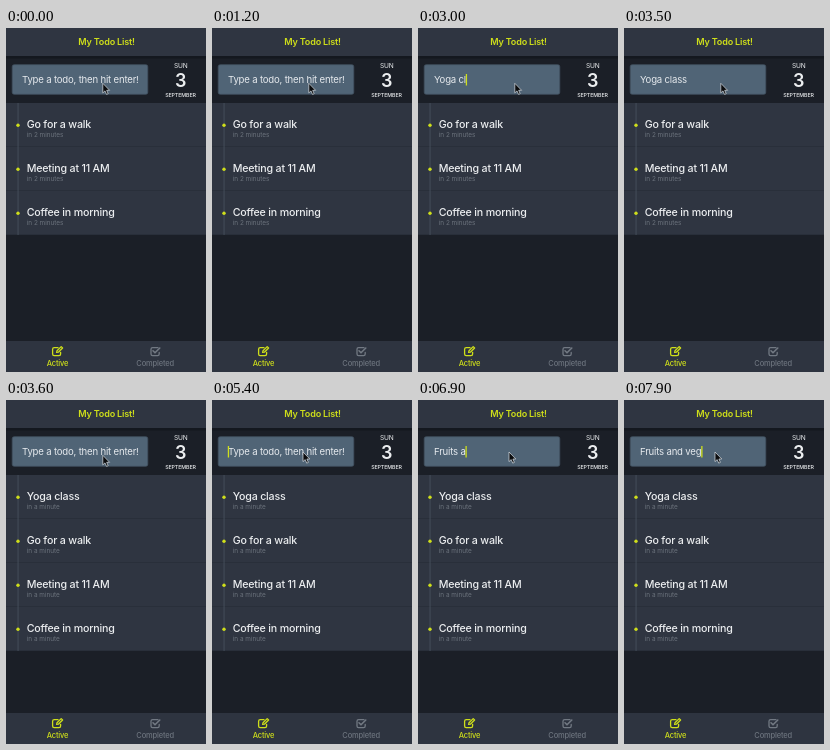
Recreate the animation shown at these times as an HTML page. Size 200x344 px, loop 8000 ms.

```html
<!DOCTYPE html>
<html lang="en">
<head>
<meta charset="utf-8">
<title>My Todo List</title>
<style>
  html, body { margin: 0; width: 100%; height: 100%; overflow: hidden; background: #1b1f27; }
  svg { display: block; width: 100%; height: 100%; }
  text { font-family: Inter, Roboto, sans-serif; letter-spacing: -.02em; white-space: pre; }
  .mid { text-anchor: middle; }
  .accent { fill: #cfdf1a; }
  .white { fill: #eceef0; }
  .muted { fill: #6c737d; }
  .field { font-size: 9.6px; fill: #e6eaee; }
  .todo { font-size: 10.67px; font-weight: 500; letter-spacing: -.018em; }
  .age { font-size: 6.4px; letter-spacing: 0; }
  .tab { font-size: 7.5px; font-weight: 500; }
  .icon { fill: none; stroke-width: 1.3; stroke-linejoin: round; stroke-linecap: round; }
</style>
</head>
<body>
<svg viewBox="0 0 200 344" preserveAspectRatio="none">
  <rect width="200" height="344" fill="#1b1f27"/>
  <rect width="200" height="28" fill="#2f3541"/>
  <rect y="28" width="200" height="2.5" fill="#14181f"/>
  <text class="mid accent" x="100.5" y="17" font-size="9.07" font-weight="600">My Todo List!</text>

  <rect x="6.2" y="36.7" width="135.6" height="29.6" rx="2" fill="#506476" stroke="#41505f" stroke-width=".8"/>
  <text id="field" class="field" x="16" y="55"></text>
  <rect id="caret" class="accent" y="46" width="1.3" height="11.5"/>

  <g class="mid white">
    <text x="174.8" y="39.8" font-size="6.6">SUN</text>
    <text x="174.5" y="58.5" font-size="18" font-weight="600">3</text>
    <text x="174.5" y="68.6" font-size="5.3" font-weight="500">SEPTEMBER</text>
  </g>

  <g id="list"></g>

  <rect y="313" width="200" height="31" fill="#2e3440"/>
  <g class="icon" stroke="#cfdf1a">
    <path d="M52 319.7h-3.8q-1.6 0-1.6 1.6v4.8q0 1.6 1.6 1.6h4.8q1.6 0 1.6-1.6v-1.8"/>
    <path d="M50.6 324.4l.4-1.6 4.2-4.2 1.4 1.4-4.2 4.2z"/>
  </g>
  <g class="icon" stroke="#727983">
    <path d="M152 319.6h-5.4q-1.6 0-1.6 1.6v4.9q0 1.6 1.6 1.6h5q1.6 0 1.6-1.6v-1.6"/>
    <path d="M147 322.8l2 2 4.8-4.8" stroke-width="1.6"/>
  </g>
  <text class="mid tab accent" x="51.5" y="338">Active</text>
  <text class="mid tab muted" x="149.2" y="338">Completed</text>

  <path id="pointer" d="M0 0V9.6L2.2 7.6 3.7 11.1 5.4 10.4 3.9 7H6.8Z"
        fill="#0b0c0e" stroke="#d9dfe4" stroke-width=".7" stroke-linejoin="round"/>
</svg>
<script>
const LOOP = 8000, ADDED = 3600, ROW = 44;
const HINT = 'Type a todo, then hit enter!';
const [field, caret, list, pointer] =
  ['field', 'caret', 'list', 'pointer'].map(id => document.getElementById(id));

// Each time is the moment one more character is in the field.
const entries = [
  { text: 'Yoga class', end: ADDED,
    keys: [1600, 2000, 2200, 2300, 2500, 2800, 3000, 3100, 3200, 3300] },
  { text: 'Fruits and veg', end: LOOP,
    keys: [5700, 6200, 6300, 6400, 6700, 6800, 6800, 6900, 7100, 7200, 7500, 7600, 7700, 7900] }
];

const clamp = v => Math.max(0, Math.min(1, v));

function row(title, age, i) {
  const y = 75 + i * ROW;
  return `<rect y="${y}" width="200" height="${ROW}" fill="#2f3541"/>
    <rect y="${y + ROW - .7}" width="200" height=".7" fill="#272d37"/>
    <rect x="11.6" y="${y}" width=".9" height="${ROW}" fill="#46505c"/>
    <circle class="accent" cx="12" cy="${y + 22.2}" r="1.7"/>
    <text class="todo white" x="20.7" y="${y + 25.4}">${title}</text>
    <text class="age muted" x="20.8" y="${y + 33.8}">${age}</text>`;
}

function listFor(added) {
  const titles = ['Go for a walk', 'Meeting at 11 AM', 'Coffee in morning'];
  if (added) titles.unshift('Yoga class');
  return titles.map((title, i) => row(title, added ? 'in a minute' : 'in 2 minutes', i)).join('');
}

function caretOpacity(t) {
  if (t < 700 || t >= 3500 && t < 5400) return 0;
  if (t < 1500) return 1 - clamp((Math.floor(t / 100) - 8) / 4);
  return t < 1600 ? .5 : 1;
}

let shown;
function draw(now) {
  const t = now % LOOP, added = t >= ADDED;
  if (added !== shown) list.innerHTML = listFor(shown = added);

  const entry = entries.find(e => t < e.end);
  const typed = entry.text.slice(0, entry.keys.filter(k => t >= k).length);
  field.textContent = typed || HINT;
  caret.setAttribute('x', 15.8 + (typed ? field.getComputedTextLength() : 0));
  caret.setAttribute('opacity', caretOpacity(t));

  const move = clamp((Math.floor(t / 100) - 46) / 3);
  pointer.setAttribute('transform', `translate(${96.8 - 5.8 * move} ${55.3 - 3.3 * move})`);
  requestAnimationFrame(() => draw(performance.now() - start));
}

const start = performance.now();
draw(0);
</script>
</body>
</html>
```
